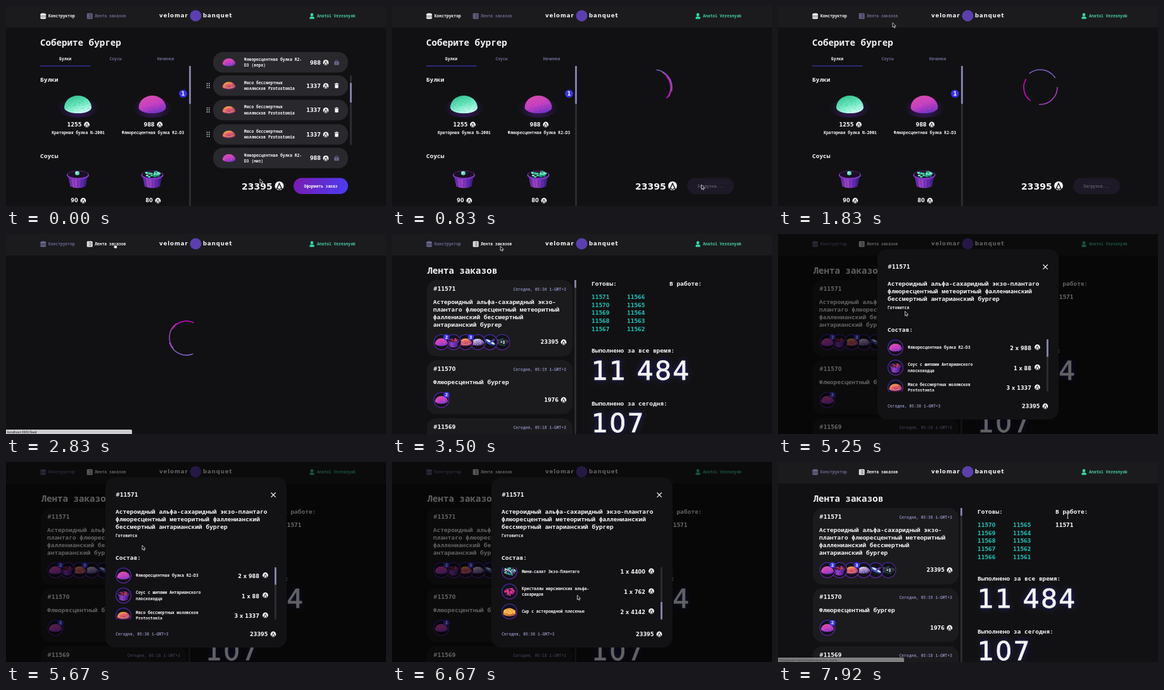
Write an HTML page with a canvas that moves like this. It is 600 by 317 pixels and loops after 8 s.

```html
<!DOCTYPE html>
<html lang="ru">
<head>
<meta charset="utf-8">
<title>Конструктор бургеров</title>
<style>
html, body { margin: 0; width: 100%; height: 100%; overflow: hidden; background: #111113; }
canvas { display: block; width: 100vw; height: 100vh; }
</style>
</head>
<body>
<canvas id="stage"></canvas>
<script>
const W = 600, H = 317, LOOP = 8000;
const canvas = document.getElementById('stage');
const dpr = window.devicePixelRatio || 1;
canvas.width = Math.round(W * dpr);
canvas.height = Math.round(H * dpr);
const c = canvas.getContext('2d');

const MONO = '"Noto Sans Mono", monospace';
const WIDE = '"DejaVu Sans", sans-serif';
const BODY = '#111113', PANEL = '#1b1b1e', CARD = '#29292d', TRACK = '#2b2b32';
const WHITE = '#f4f4f6', GREY = '#66668c', LILAC = '#8080aa', TEAL = '#1fb9ae', BLUE = '#3b33e6';

// Moments of hard changes, ms
const AT = { order: 730, hover: 1920, feed: 2250, loaded: 3100, leave: 3500,
  card: 4080, modal: 5250, close: 7620, wait: 7830 };

// Text: y is the middle of the capitals
function text(s, x, y, size, color = WHITE, weight = 400, align = 'left', family = MONO, gap = 0) {
  c.font = `${weight} ${size}px ${family}`;
  c.letterSpacing = gap + 'px';
  c.textAlign = align;
  c.fillStyle = color;
  c.fillText(s, x, y + size * 0.36);
}
const label = (s, x, y, color, align) => text(s, x, y, 6.33, color, 600, align);
const head = (s, x, y) => text(s, x, y, 9.5, WHITE, 700);
const title = (s, x, y) => text(s, x, y, 14.2, WHITE, 700);
const num = (s, x, y, align = 'left', size = 8.2, color = WHITE) => text(s, x, y, size, color, 700, align, WIDE);

function box(x, y, w, h, r, fill) {
  c.beginPath();
  c.roundRect(x, y, w, h, r);
  c.fillStyle = fill;
  c.fill();
}
function oval(x, y, rx, ry, fill, turn = 0) {
  c.beginPath();
  c.ellipse(x, y, rx, ry, turn, 0, Math.PI * 2);
  c.fillStyle = fill;
  c.fill();
}
function line(color, width, ...p) {
  c.beginPath();
  for (let i = 0; i < p.length; i += 2) c.lineTo(p[i], p[i + 1]);
  c.strokeStyle = color;
  c.lineWidth = width;
  c.stroke();
}
function blend(x0, y0, x1, y1, ...colors) {
  const g = c.createLinearGradient(x0, y0, x1, y1);
  colors.forEach((k, i) => g.addColorStop(i / (colors.length - 1), k));
  return g;
}
function clipped(x, y, w, h, draw) {
  c.save();
  c.beginPath();
  c.rect(x, y, w, h);
  c.clip();
  draw();
  c.restore();
}
function noise(seed) {
  return () => (seed = (seed * 16807) % 2147483647) / 2147483647;
}

// Currency sign: a ball cut by rays from its top
function coin(x, y, r = 4.4) {
  oval(x, y, r, r, WHITE);
  const top = y - r * 0.55;
  line(BODY, r * 0.2, x - r * 0.65, y + r * 0.85, x, top, x + r * 0.65, y + r * 0.85);
  line(BODY, r * 0.16, x - r * 0.5, y + r * 0.5, x, y + r * 0.85, x + r * 0.5, y + r * 0.5);
}
function badge(s, x, y, r) {
  oval(x, y, r, r, BLUE);
  num(s, x, y, 'center', r * 1.35);
}

// Food
function dome(x, y, w, h, colors, specks) {
  c.save();
  c.beginPath();
  c.ellipse(x, y + h * 0.18, w / 2, h * 0.68, 0, Math.PI, 0);
  c.ellipse(x, y + h * 0.18, w / 2, h * 0.32, 0, 0, Math.PI);
  c.fillStyle = blend(x - w * 0.1, y - h / 2, x + w * 0.1, y + h / 2, ...colors);
  c.fill();
  c.clip();
  const rnd = noise(77);
  for (let i = 0; i < w * 3; i++) {
    const dx = (rnd() - 0.5) * w, dy = (rnd() - 0.55) * h * 0.8;
    oval(x + dx, y + dy, 0.45, 0.35, specks);
  }
  c.restore();
}
function pot(x, y, s, filling) {
  c.beginPath();
  c.moveTo(x - 16 * s, y - 6 * s);
  c.lineTo(x - 12 * s, y + 13 * s);
  c.quadraticCurveTo(x, y + 18 * s, x + 12 * s, y + 13 * s);
  c.lineTo(x + 16 * s, y - 6 * s);
  c.fillStyle = blend(x - 16 * s, y, x + 16 * s, y, '#4b249c', '#a347c8', '#692db5', '#30186e');
  c.fill();
  for (let k = -2; k <= 2; k++) line('#391a7a', 0.6 * s, x + k * 6 * s, y, x + k * 4.6 * s, y + 14 * s);
  oval(x, y - 5 * s, 17.5 * s, 7 * s, '#8338c6');
  oval(x, y - 6 * s, 16 * s, 5.6 * s, '#1a1024');
  if (filling === 'ball') {
    oval(x - 1 * s, y - 8 * s, 3.5 * s, 3.3 * s, '#52dfb2');
    oval(x - 2 * s, y - 9 * s, 1.4 * s, 1.2 * s, '#e3fff3');
  } else {
    const rnd = noise(12);
    for (let i = 0; i < 30; i++) {
      const a = rnd() * 6.28, d = Math.sqrt(rnd());
      oval(x + Math.cos(a) * d * 13 * s, y - 6.5 * s + Math.sin(a) * d * 4.5 * s, 2.2 * s, 1.4 * s, filling[i % filling.length]);
    }
  }
}
function bits(x, y, w, h, seed, colors) {
  const rnd = noise(seed);
  for (let i = 0; i < 60; i++) {
    const a = rnd() * 6.28, d = Math.sqrt(rnd());
    oval(x + Math.cos(a) * d * w / 2, y + Math.sin(a) * d * h / 2, 1.4, 1, colors[i % colors.length]);
  }
}
const PINK_BUN = ['#d74aae', '#c13ec4', '#7433c4'];
const foods = [
  (x, y) => dome(x, y, 20, 12.5, PINK_BUN, '#ef6b96'),
  (x, y) => pot(x, y, 0.53, ['#bd3552', '#d8487c', '#8a2a62']),
  (x, y) => {
    dome(x, y, 20, 12, ['#f2a444', '#d94a72', '#8a2a7f'], '#ffc85a');
    line('#e8b04c', 0.9, x - 8, y + 2, x, y + 4, x + 8, y + 2);
  },
  (x, y) => dome(x, y, 20, 11, ['#d9cdea', '#9a82c2', '#4b347d'], '#f1ecfa'),
  (x, y) => {
    oval(x, y, 9.5, 3.6, '#2f4aa6', 0.45);
    oval(x + 1, y - 0.5, 8, 1.5, '#dcecfa', 0.5);
    oval(x + 4, y - 2, 5, 1.6, '#5a3fae', -0.6);
  },
  (x, y) => bits(x, y, 20, 12, 41, ['#36c8a2', '#d7eee4', '#7a3c94', '#1e8a86']),
  (x, y) => bits(x, y, 15, 12, 53, ['#e62f8d', '#b62292', '#ff4d76', '#7b1b83']),
  (x, y) => {
    dome(x, y + 1, 20, 13, ['#ffba42', '#f09635', '#b95a3b'], '#d98234');
    bits(x, y, 17, 8, 61, ['#f3a13b', '#ffc65d']);
  },
];
function ringed(kind, x, y) {
  const r = 12.4;
  oval(x, y, r, r, blend(x - r, y - r, x + r, y + r, '#4033e0', '#8424b8'));
  oval(x, y, r - 1, r - 1, '#131218');
  foods[kind](x, y);
}

// Header
function burgerMark(x, y, color) {
  box(x - 4.6, y - 4.6, 9.2, 3.6, [3.5, 3.5, 0.8, 0.8], color);
  box(x - 4.6, y - 0.4, 9.2, 1.6, 0.8, color);
  box(x - 4.6, y + 1.8, 9.2, 2.8, [0.6, 0.6, 2, 2], color);
}
function listMark(x, y, color) {
  box(x - 4.4, y - 4.4, 8.8, 8.8, 1.2, color);
  for (let i = -1; i <= 1; i++) {
    line(PANEL, 0.8, x - 2.8, y + i * 2.3, x - 1.9, y + i * 2.3);
    line(PANEL, 0.8, x - 1, y + i * 2.3, x + 2.9, y + i * 2.3);
  }
}
function header(onFeed) {
  box(0, 0, W, 34, 0, PANEL);
  const left = onFeed ? GREY : WHITE, right = onFeed ? WHITE : GREY;
  burgerMark(58.7, 16, left);
  label('Конструктор', 67, 16, left);
  listMark(132.2, 16, right);
  label('Лента заказов', 140, 16, right);
  text('velomar', 242, 15, 8.6, WHITE, 700, 'left', WIDE, 0.9);
  oval(299.5, 15.5, 9, 9, '#5b3fae');
  text('banquet', 311, 15, 8.6, WHITE, 700, 'left', WIDE, 0.9);
  oval(483, 13.8, 2.3, 2.6, '#35d6a5');
  box(479.3, 16.7, 7.6, 3.9, [2.5, 2.5, 1, 1], '#35d6a5');
  label('Anatol Veresnyak', 491, 16, '#45c99f');
}

// Builder page
function lock(x, y) {
  c.beginPath();
  c.arc(x, y - 1.2, 2.2, Math.PI, 0);
  c.strokeStyle = GREY;
  c.lineWidth = 1;
  c.stroke();
  box(x - 3.8, y - 1.2, 7.6, 5.6, 1, GREY);
  line(CARD, 0.8, x, y + 0.6, x, y + 2.5);
}
function bin(x, y) {
  box(x - 3.3, y - 3.4, 6.6, 1.2, 0.5, WHITE);
  box(x - 1.2, y - 4.2, 2.4, 1.2, 0.4, WHITE);
  box(x - 2.7, y - 1.7, 5.4, 5.7, [0.3, 0.3, 1.2, 1.2], WHITE);
}
function goods(x, y, price, name) {
  const w = price.length * 5.7;
  num(price, x - w / 2 - 6, y);
  coin(x + w / 2 + 2.2, y);
  if (name) label(name, x, y + 13, WHITE, 'center');
}
function row(y, kind, lines, price, locked) {
  box(327, y - 16.2, 213, 32.6, 15.5, CARD);
  foods[kind](352, y);
  lines.forEach((s, i) => label(s, 376, y - 4.6 + i * 9.4));
  num(price, 497, y + 0.5, 'right');
  coin(505, y + 0.5);
  if (locked) return lock(522, y);
  bin(522, y);
  for (let i = 0; i < 6; i++) oval(317.6 + (i % 2) * 3.2, y - 3.3 + (i >> 1) * 3.2, 0.85, 0.85, WHITE);
}
function builder(t) {
  title('Соберите бургер', 54, 58);
  label('Булки', 93.5, 84, WHITE, 'center');
  label('Соусы', 173, 84, GREY, 'center');
  label('Начинки', 252, 84, GREY, 'center');
  box(54, 94.4, 79.5, 1, 0, '#4a43e2');
  box(289, 95, 3, 222, 0, TRACK);
  box(289, 95, 3, 60, 0, LILAC);
  head('Булки', 54, 117);
  for (const x of [114, 231]) {
    const glow = c.createRadialGradient(x, 162, 4, x, 162, 32);
    glow.addColorStop(0, 'rgba(84,30,150,.55)');
    glow.addColorStop(1, 'rgba(84,30,150,0)');
    oval(x, 162, 32, 15, glow);
  }
  dome(113.5, 156, 43, 28, ['#35c695', '#6de8c0', '#cbfdf2'], '#2fa987');
  dome(231, 156, 43, 28, PINK_BUN, '#e8618f');
  badge('1', 279.5, 139, 6.3);
  goods(114, 188, '1255', 'Краторная булка N-200i');
  goods(232, 188, '988', 'Флюоресцентная булка R2-D3');
  head('Соусы', 54, 237.5);
  pot(113.5, 273, 1, 'ball');
  pot(231, 273, 1, ['#43d6a3', '#1f8d78', '#7be8c3']);
  goods(114, 308.5, '90');
  goods(232, 308.5, '80');

  if (t >= AT.order) {
    spinner(414, 129, t - AT.order);
    num('23395', 384, 285.5, 'left', 14);
    coin(443, 285, 7);
    box(466, 272.5, 74, 25.5, 12.7, '#1d1926');
    label('Загрузка...', 503, 285.5, '#5d5967', 'center');
    return;
  }
  const bun = 'Флюоресцентная булка R2-';
  const meat = ['Мясо бессмертных', 'моллюсков Protostomia'];
  row(89.2, 0, [bun, 'D3 (верх)'], '988', true);
  for (let i = 0; i < 3; i++) row(126.2 + i * 38.6, 2, meat, '1337');
  row(240.9, 0, [bun, 'D3 (низ)'], '988', true);
  box(543, 110, 3, 110, 0, TRACK);
  box(543, 122, 3, 31, 0, LILAC);
  num('23395', 372, 285.5, 'left', 14);
  coin(431.5, 285, 7);
  box(454, 272.5, 86, 25.5, 12.7, blend(454, 272, 540, 298, '#7a1bb0', '#4a3df2'));
  label('Оформить заказ', 497, 285.5, WHITE, 'center');
}

// [start angle, degrees per second, sweep, colour]
const ARCS = [[-67, 315, 93, '#8060c8'], [-57, 421, 93, '#a040b8'], [-54, 529, 82, '#cc0fc2']];
function spinner(x, y, t) {
  c.lineCap = 'round';
  c.lineWidth = 1.6;
  ARCS.forEach(([from, speed, sweep, color], i) => {
    const mid = from + speed * t / 1000, rad = Math.PI / 180;
    c.beginPath();
    c.arc(x, y, 28 - i, (mid - sweep / 2) * rad, (mid + sweep / 2) * rad);
    c.strokeStyle = color;
    c.stroke();
  });
  c.lineCap = 'butt';
}

// Feed page
function order(y, h, id, time, lines, price) {
  box(55, y, 230, h, 15.5, PANEL);
  num('#' + id, 65, y + 14.5);
  label(`Сегодня, ${time} i-GMT+3`, 275, y + 14.5, LILAC, 'right');
  lines.forEach((s, i) => head(s, 65, y + 35 + i * 12));
  if (!price) return;
  num(price, 263, y + h - 22.5, 'right');
  coin(271, y + h - 22.5);
}
function glowing(s, y) {
  c.save();
  c.shadowColor = 'rgba(51,51,255,.6)';
  c.shadowBlur = 9 * dpr;
  text(s, 315, y, 41, WHITE, 400, 'left', WIDE, 2.2);
  c.restore();
  c.strokeStyle = WHITE;
  c.lineWidth = 0.8;
  c.font = `400 41px ${WIDE}`;
  c.letterSpacing = '2.2px';
  c.strokeText(s, 315, y + 41 * 0.36);
}
function feed(cooking) {
  title('Лента заказов', 55.5, 58);
  clipped(0, 73, 300, 244, () => {
    order(73, 121, 11571, '05:36', ['Астероидный альфа-сахаридный экзо-', 'плантаго флюоресцентный метеоритный',
      'фалленианский бессмертный', 'антарианский бургер'], '23395');
    ringed(5, 174, 171.5);
    oval(174, 171.5, 11.4, 11.4, 'rgba(15,14,20,.7)');
    label('+3', 174.5, 171.5, WHITE, 'center');
    for (let i = 4; i >= 0; i--) ringed(i, 78 + i * 19.1, 171.5);
    badge('2', 86, 163.5, 4.8);
    badge('3', 124.3, 163.5, 4.8);
    order(200, 85.5, 11570, '05:19', ['Флюоресцентный бургер'], '1976');
    ringed(0, 78, 263);
    badge('2', 86, 255, 4.8);
    order(292, 85, 11569, '05:18', []);
    box(288, 73, 3, 244, 0, TRACK);
    box(288, 73, 3, 12, 0, LILAC);
  });
  head('Готовы:', 315, 79);
  head('В работе:', 438, 79);
  const first = cooking ? 11570 : 11571;
  for (let i = 0; i < 10; i++) {
    num(first - i, 315 + (i > 4 ? 56 : 0), 99.8 + (i % 5) * 12.8, 'left', 8.2, TEAL);
  }
  if (cooking) num('11571', 438, 99.8);
  head('Выполнено за все время:', 315, 185);
  glowing('11 484', 216);
  head('Выполнено за сегодня:', 315, 268.5);
  glowing('107', 299.5);
}

const PARTS = [
  ['Флюоресцентная булка R2-D3', '2 x 988'],
  ['Соус с шипами Антарианского|плоскоходца', '1 x 88'],
  ['Мясо бессмертных моллюсков|Protostomia', '3 x 1337'],
  ['Говяжий метеорит (отбивная)', '1 x 3000'],
  ['Плоды Фалленианского дерева', '1 x 874'],
  ['Мини-салат Экзо-Плантаго', '1 x 4400'],
  ['Кристаллы марсианских альфа-|сахаридов', '1 x 762'],
  ['Сыр с астероидной плесенью', '2 x 4142'],
];
const clamp = k => Math.min(1, Math.max(0, k));
const ease = k => (k = clamp(k), k * k * (3 - 2 * k));
function modal(t) {
  box(0, 0, W, H, 0, 'rgba(0,0,0,.6)');
  box(157, 24, 286, 270, 15.5, '#121214');
  num('#11571', 173, 52.5);
  line(WHITE, 1.2, 418.5, 48.5, 425.8, 55.8);
  line(WHITE, 1.2, 425.8, 48.5, 418.5, 55.8);
  head('Астероидный альфа-сахаридный экзо-плантаго', 173, 79);
  head('флюоресцентный метеоритный фалленианский', 173, 91);
  head('бессмертный антарианский бургер', 173, 103);
  label('Готовится', 173, 117);
  head('Состав:', 173, 151.5);
  const k = ease((t - 5950) / 620);
  clipped(160, 167, 262, 82.5, () => PARTS.forEach(([name, price], i) => {
    const y = 180 + i * 31.7 - k * 165, lines = name.split('|');
    ringed(i, 185.5, y);
    lines.forEach((s, j) => label(s, 205, y + (j - (lines.length - 1) / 2) * 9.5));
    num(price, 400, y + 1, 'right');
    coin(409.5, y - 0.5);
  }));
  box(424, 167, 3, 82.5, 0, TRACK);
  box(424, 167 + k * 55, 3, 27.5, 0, LILAC);
  label('Сегодня, 05:36 i-GMT+3', 173, 273, LILAC);
  num('23395', 413.5, 273, 'right');
  coin(422, 273);
}

// Status bubble, fading in over its first moments
function status(s, age, width = 199) {
  c.globalAlpha = clamp(age / 160);
  box(0, 310, width, 7, [0, 2, 0, 0], '#cdcdd0');
  text(s, 2, 314, 5.2, '#1c1c1e', 400, 'left', 'Roboto, sans-serif');
  c.globalAlpha = 1;
}

// Pointer: [time, x, y]
const PATH = [[0, 401, 274], [480, 490, 284], [1000, 488, 283], [1830, 181, 26.5], [2050, 170, 15], [3400, 170, 15],
  [4250, 200, 122], [5200, 200, 122], [5670, 215, 132], [5950, 288, 207], [6670, 292.5, 211],
  [7250, 420, 50], [7640, 420, 50], [7900, 457.5, 86]];
function pointerAt(t) {
  const i = PATH.findIndex(p => p[0] > t);
  if (i < 0) return PATH[PATH.length - 1].slice(1);
  const [t0, x0, y0] = PATH[i - 1], [t1, x1, y1] = PATH[i];
  const k = ease((t - t0) / (t1 - t0));
  return [x0 + (x1 - x0) * k, y0 + (y1 - y0) * k];
}
const ARROW = new Path2D('M0 0V7.2L1.7 5.7 2.8 8.2 4 7.7 2.9 5.3H5.1Z');
const HAND = new Path2D('M1 .6Q1.8-.2 2.4.7V3L5 3.6Q5.9 4 5.7 5L5 8H1.6L-.6 5.2Q-.5 4.2.9 4.8Z');
function pointer(t) {
  const [x, y] = pointerAt(t);
  const onButton = t > 330 && t < AT.order;
  const onLink = t >= AT.hover && t < AT.leave;
  const onCard = t >= AT.card && t < AT.modal;
  const onCross = t > 7180 && t < AT.close;
  if (t > 7830) {
    line('#d0d0d0', 0.9, x - 1.5, y - 3.5, x, y - 3, x, y + 3, x - 1.5, y + 3.5);
    line('#d0d0d0', 0.9, x + 1.5, y - 3.5, x, y - 3, x, y + 3, x + 1.5, y + 3.5);
    return;
  }
  const hand = onButton || onLink || onCard || onCross;
  c.save();
  c.translate(x, y);
  c.fillStyle = hand ? '#f4f4f4' : '#08080a';
  c.strokeStyle = hand ? '#202022' : '#e4e4e4';
  c.lineWidth = 0.8;
  c.fill(hand ? HAND : ARROW);
  c.stroke(hand ? HAND : ARROW);
  c.restore();
}

function draw(now) {
  const t = now % LOOP;
  c.setTransform(canvas.width / W, 0, 0, canvas.height / H, 0, 0);
  box(0, 0, W, H, 0, BODY);
  header(t >= AT.feed);
  if (t < AT.feed) builder(t);
  else if (t < AT.loaded) spinner(285, 164, t - AT.feed);
  else feed(t >= AT.modal);
  if (t >= AT.modal && t < AT.close) modal(t);
  if (t >= AT.hover && t < AT.leave) status('localhost:3000/feed', t - AT.hover);
  if (t >= AT.card && t < AT.modal) status('localhost:3000/feed/622b5e6125b9a4001b6e4276', t - AT.card, 119.5);
  if (t >= AT.wait) status('Ожидание norma.nomoreparties.space...', t - AT.wait);
  pointer(t);
}
const start = performance.now();
function tick() {
  draw(performance.now() - start);
  requestAnimationFrame(tick);
}
tick();
</script>
</body>
</html>
```
